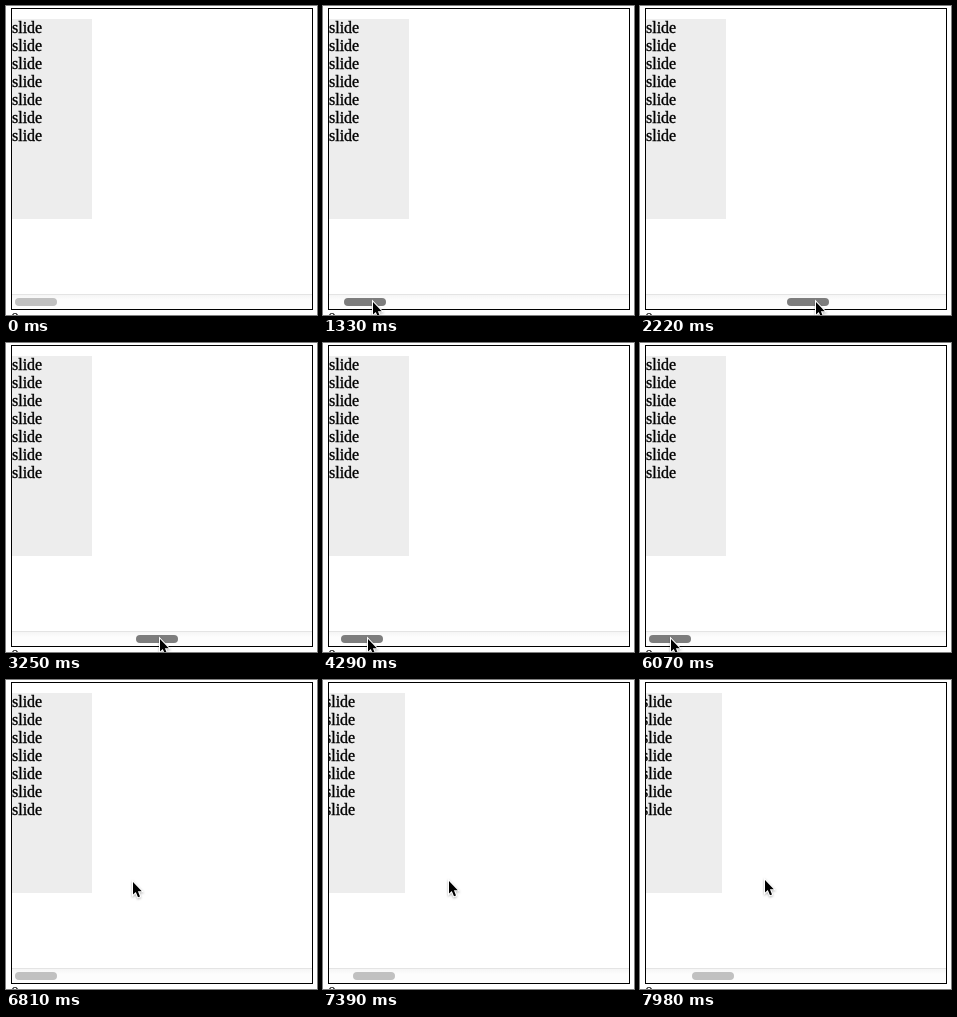
An HTML page that plays this animation: 311x309 px, repeating every 8 s.

```html
<!DOCTYPE html>
<html lang="en">
<head>
<meta charset="utf-8">
<title>Slider</title>
<style>
  html, body { margin: 0; width: 100%; height: 100%; overflow: hidden; background: #fff; }
  body { position: relative; font: 16px/18px "Liberation Serif", Times, serif; color: #000; }
  div, svg { position: absolute; }
  #view { left: 5px; top: 2px; width: 300px; height: 300px; border: 1px solid #000; overflow: hidden; }
  #column { left: 0; top: 10px; width: 80px; height: 200px; background: #ededed; white-space: pre; -webkit-text-stroke: .35px #000; }
  #track { left: 0; top: 285px; width: 300px; height: 14px; background: linear-gradient(#f5f5f5, #fdfdfd 5px); border-top: 1px solid #e4e4e4; }
  #thumb { left: 0; top: 3px; width: 42px; height: 8px; border-radius: 4px; }
  #count { left: 5px; top: 304px; }
  #cursor { left: 0; top: 0; overflow: visible; filter: drop-shadow(0 1px 1px rgba(0,0,0,.3)); }
</style>
</head>
<body>
<div id="count">0</div>
<div id="view">
  <div id="column"></div>
  <div id="track"><div id="thumb"></div></div>
</div>
<svg id="cursor" width="14" height="20">
  <path d="M0 0V12.6L2.8 10L5 15.2L7 14.4L4.9 9.2H8.8Z" stroke="#fff" stroke-width="2" paint-order="stroke"/>
</svg>
<script>
const LOOP = 8000, START = 295, STEP = 147.7;
const $ = id => document.getElementById(id);
const column = $('column'), thumb = $('thumb'), cursor = $('cursor');
column.textContent = Array(7).fill('slide').join('\n');

// Cosine easing between [step, value] turning points
const swing = (...points) => k => {
  const i = points.findIndex(p => p[0] > k);
  if (i < 0) return points[points.length - 1][1];
  if (!i) return points[0][1];
  const [k0, a] = points[i - 1], [k1, b] = points[i];
  return a + (b - a) * (1 - Math.cos(Math.PI * (k - k0) / (k1 - k0))) / 2;
};

const drag = swing([5.1, 9], [16.5, 185], [25.5, 18], [27, 18], [32.85, 165], [39, 9]);
const fling = swing([44, 0], [52, 43]);
const scroll = swing([44, 0], [47, 4]);
// Pointer position: offset from the dragged thumb, and height
const grip = swing([13, 29], [20, 24], [27, 27], [34, 22], [40, 22], [43, 118], [44, 118], [52, 116]);
const height = swing([0, 303], [2, 296], [40, 296], [43, 202], [44, 202], [52, 200]);

const move = (el, x, y) => {
  el.style.transform = `translate(${Math.round(x)}px, ${Math.round(y)}px)`;
};

function draw(t) {
  const k = Math.floor((t - START) / STEP);
  const dragging = k >= 5 && k < 40;
  move(thumb, drag(k) + fling(k) - 6, 0);
  thumb.style.background = dragging ? '#7d7d7d' : '#c1c1c1';
  move(column, -scroll(k), 0);
  move(cursor, drag(k) + grip(k), height(k));
  cursor.style.visibility = k < 0 ? 'hidden' : 'visible';
}

const begin = performance.now();
function tick() {
  draw((performance.now() - begin) % LOOP);
  requestAnimationFrame(tick);
}
tick();
</script>
</body>
</html>
```
